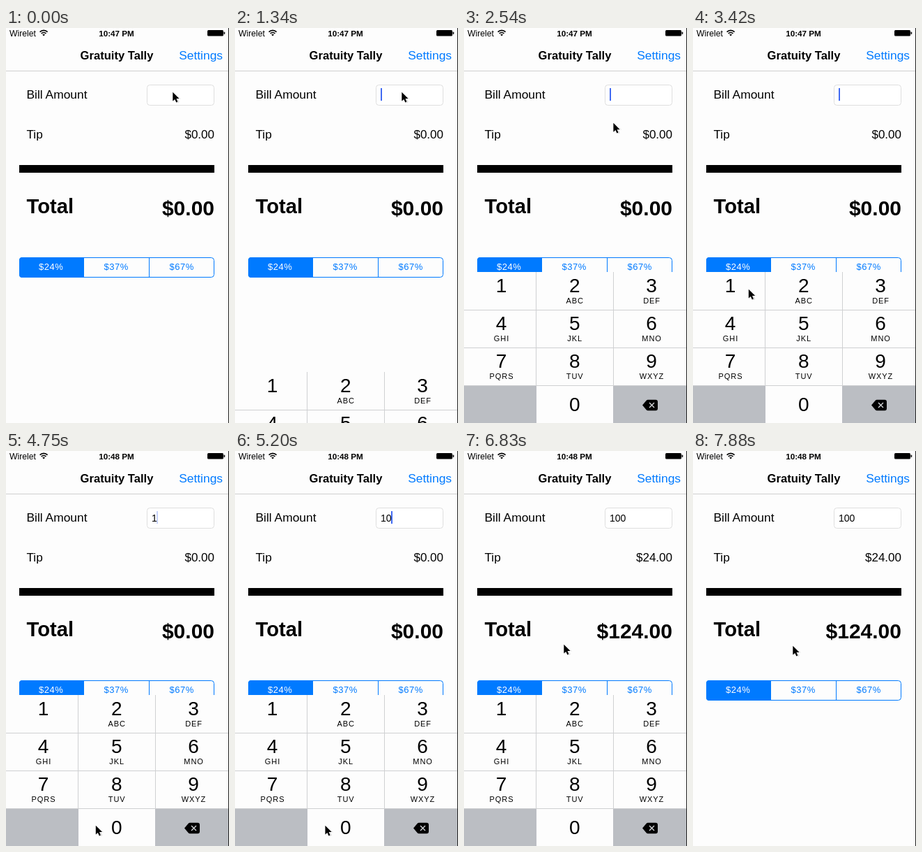
Animation of 320 by 565 pixels, one loop 8000 ms. Source, as an HTML page:

```html
<!DOCTYPE html>
<html lang="en">
<head>
<meta charset="utf-8">
<title>Gratuity Tally</title>
<style>
  html, body { margin: 0; width: 100%; height: 100%; overflow: hidden; background: #fdfdfd; }
  svg { display: block; width: 320px; height: 565px; }
  text { font-family: "Liberation Sans", Arial, sans-serif; font-size: 17.2px; }
  .bold { font-weight: bold; }
  .mid { text-anchor: middle; }
  .end { text-anchor: end; }
  .blue { fill: #007aff; }
  .seg { font-size: 13px; letter-spacing: .5px; text-anchor: middle; }
  .digit { font-size: 28px; text-anchor: middle; }
  .letters { font-size: 11px; letter-spacing: .9px; text-anchor: middle; }
</style>
</head>
<body>
<svg viewBox="0 0 320 565">
  <rect width="320" height="565" fill="#fdfdfd"/>

  <text x="5" y="11.5" style="font-size:12.2px">Wirelet</text>
  <g fill="none" stroke="#000" stroke-width="1.7">
    <path d="M48.6 5.6a7.8 7.8 0 0 1 11 0M50.7 7.9a4.8 4.8 0 0 1 6.8 0"/>
    <path d="M54.1 11.6l-1.9-2a2.7 2.7 0 0 1 3.8 0z" fill="#000" stroke="none"/>
  </g>
  <text id="clock" class="bold mid" x="158.5" y="11.5" style="font-size:11.7px"></text>
  <rect x="289" y="3" width="23" height="8.5" rx="1.5"/>
  <rect x="312.6" y="5.500" width="1.6" height="3.500" rx=".8"/>

  <text class="bold mid" x="159" y="45" style="font-size:16.6px">Gratuity Tally</text>
  <text class="blue end" x="311" y="45" style="font-size:17.4px">Settings</text>
  <rect y="61" width="320" height="1" fill="#cfcfcf"/>

  <text x="29.5" y="101" style="font-size:17.4px">Bill Amount</text>
  <rect x="202.5" y="81.5" width="96" height="29" rx="4" fill="#fff" stroke="#dedede"/>
  <text id="bill" x="209" y="101" style="font-size:14px"></text>
  <rect id="caret" y="86" width="2" height="18" fill="#426bf2"/>
  <text x="29.5" y="158">Tip</text>
  <text id="tip" class="end" x="299" y="158" style="font-size:17px"></text>
  <rect x="19" y="196" width="280" height="11"/>
  <text class="bold" x="29.5" y="265" style="font-size:29.2px">Total</text>
  <text id="total" class="bold end" x="299" y="268" style="font-size:30px"></text>

  <rect x="19.5" y="328.5" width="279" height="28" rx="4" fill="none" stroke="#007aff"/>
  <path class="blue" d="M112 328V357H23a4 4 0 0 1-4-4V332a4 4 0 0 1 4-4zM205 328h1v29h-1z"/>
  <text class="seg" x="64.7" y="346" fill="#fff">$24%</text>
  <text class="seg blue" x="158.2" y="346">$37%</text>
  <text class="seg blue" x="252.2" y="346">$67%</text>

  <g id="pad"></g>
  <rect x="319" width="1" height="565" fill="#222"/>
  <g id="mouse">
    <path d="M1.500 2v12.500l3.400-2.900 2.300 4.700 2.800-1.200-2-4.600h4.400z" opacity=".2"/>
    <path d="M.8 .8V13.600l3-2.700 2 4.500 2.100-.9-1.900-4.400h4.100z" stroke="#fff" stroke-width="1.600" paint-order="stroke"/>
  </g>
</svg>
<script>
const $ = id => document.getElementById(id);
const LOOP = 8000, TICK = 148.35, PAD_TOP = 349, PAD_H = 216;
const GREY = '#bbbec3', WHITE = '#fdfdfd';
const colX = [0, 104, 214, 320], midX = [53.5, 158.7, 269];
const letters = ['', 'ABC', 'DEF', 'GHI', 'JKL', 'MNO', 'PQRS', 'TUV', 'WXYZ'];

// tick, x, y of the pointer
const route = [
  [0, 238.5, 91], [15, 238.5, 91], [23, 79, 373], [28, 79, 373],
  [32, 128, 535], [37, 129, 535], [39, 121.5, 268], [40, 121.5, 268],
  [42, 142.5, 276], [52, 142.5, 276], [53, 142.5, 278]
];
// first tick, last tick, opacity
const blinks = [[9, 12, 1], [16, 19, 1], [23, 25, 1], [27, 31, 1], [32, 32, .3], [34, 40, 1], [44, 45, 1]];

function buildPad() {
  let s = `<rect width="320" height="${PAD_H}" fill="${WHITE}"/>`;
  for (let i = 0; i < 12; i++) {
    const c = i % 3, y = 54 * (i / 3 | 0), digit = i < 9 ? i + 1 : 0;
    const side = i === 9 || i === 11;
    s += `<rect ${side ? '' : `id="key${digit}"`} x="${colX[c]}" y="${y}" width="${colX[c + 1] - colX[c]}"
      height="54" fill="${side ? GREY : WHITE}"/>`;
    if (!side) s += `<text class="digit" x="${midX[c]}" y="${y + (digit ? 29 : 37)}">${digit}</text>`;
    if (letters[i]) s += `<text class="letters" x="${midX[c] + .5}" y="${y + 45}">${letters[i]}</text>`;
  }
  s += `<path d="M0 54.5H320M0 108.5H320M0 162.5H320M103.5 0V162M214.5 0V162" stroke="#cfd0d2"/>
    <path d="M256 190.5l5.5-6.5q1-1.2 2.5-1.2h11q3 0 3 3v9.4q0 3-3 3h-11q-1.5 0-2.5-1.2z"/>
    <path d="M266 187l7 7m0-7l-7 7" stroke="#d4d6d9" stroke-width="1.4"/>`;
  $('pad').innerHTML = s;
}

function pointer(n) {
  const i = route.findIndex(p => p[0] > n);
  if (i < 0) return route[route.length - 1].slice(1);
  const [a, x0, y0] = route[i - 1], [b, x1, y1] = route[i];
  const u = (n - a) / (b - a), e = u * u * (3 - 2 * u);
  return [x0 + (x1 - x0) * e, y0 + (y1 - y0) * e];
}

// Remaining share of a critically damped spring after s seconds
const spring = s => (1 + 20 * s) * Math.exp(-20 * s);

function padOffset(n) {
  if (n < 9 || n > 49) return PAD_H;
  const sec = k => (n - k) * TICK / 1000;
  const left = n < 46 ? spring(sec(9) + .06) : 1 - spring(sec(46));
  return Math.round(PAD_H * left);
}

function draw(now) {
  const n = Math.floor(now % LOOP / TICK);
  const bill = n < 27 ? '' : n < 35 ? '1' : n < 37 ? '10' : '100';
  const paid = n < 46 ? 0 : 100, tip = paid * .24;
  const blink = blinks.find(([a, b]) => n >= a && n <= b);

  $('clock').textContent = n < 29 ? '10:47 PM' : '10:48 PM';
  $('bill').textContent = bill;
  $('tip').textContent = '$' + tip.toFixed(2);
  $('total').textContent = '$' + (paid + tip).toFixed(2);
  $('caret').setAttribute('x', Math.floor(209 + 7.78 * bill.length));
  $('caret').setAttribute('opacity', blink ? blink[2] : 0);
  $('key1').setAttribute('fill', n === 27 ? GREY : WHITE);
  $('key0').setAttribute('fill', n === 34 || n === 36 ? GREY : WHITE);
  $('pad').setAttribute('transform', `translate(0 ${PAD_TOP + padOffset(n)})`);
  $('mouse').setAttribute('transform', `translate(${pointer(n)})`);
  requestAnimationFrame(draw);
}

buildPad();
draw(0);
</script>
</body>
</html>
```
